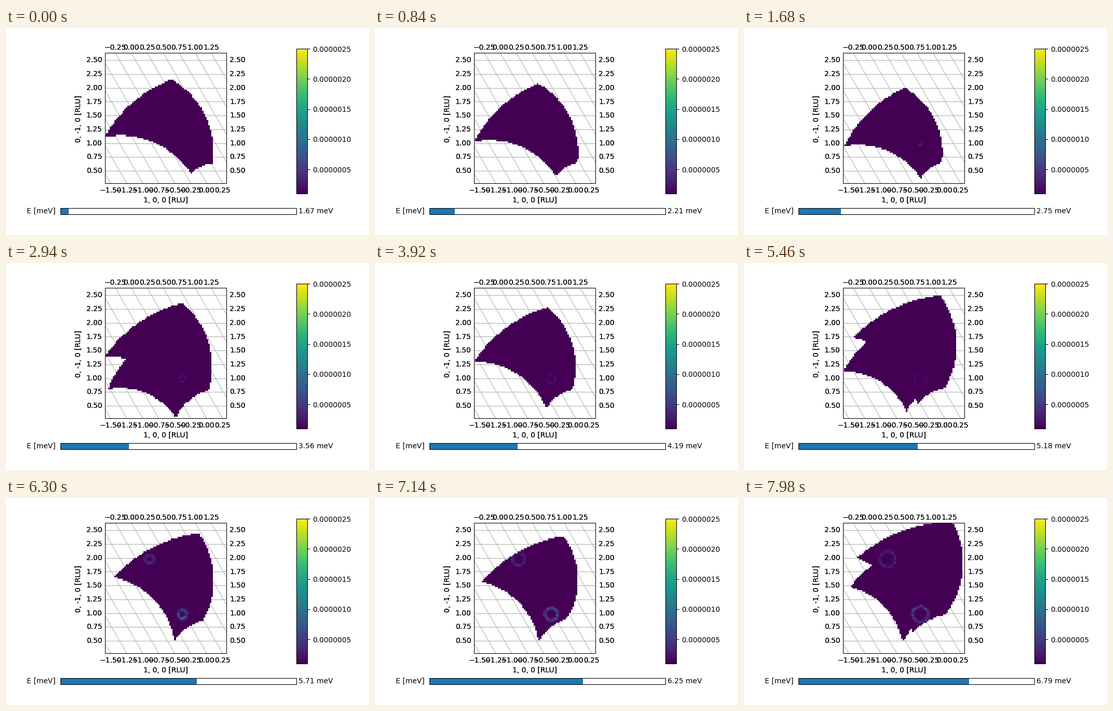
Write a matplotlib script that moves like this. It is 700 by 400 pixels and loops after 8000 ms.

```python
import numpy as np
import matplotlib
import matplotlib.pyplot as plt
from matplotlib.animation import FuncAnimation
from matplotlib.collections import LineCollection
from matplotlib.patches import Rectangle

W, H, DPI = 700, 400, 100
TICK, STEP, LOOP = 20, 140, 8000          # ms
LEFT, TOP, RIGHT, BOTTOM = 191, 48, 425, 300

OX, OY = 403.8, 329.3                     # Q = 0 in pixels
UNIT = 123.3                              # pixels per RLU
ROW = UNIT * np.sqrt(3) / 2
CELL, X0, Y0 = 3.12, 190.3, 47.3

E0, DE = 1.6733, 0.0898                   # meV at the first step, per step
EF_MAX = 5.08                             # highest analysed energy
PERIOD, SPAN = 19, 21                     # steps between and within settings
TILTS = (62.0, 52.3, 42.4, 35.4)          # beam direction of each setting
SWEEP, FAN = 40.8, 67.2                   # sample rotation, detector range

# Spin-wave branches: gap, ring growth, strength, decay, ring width
BRANCHES = [(2.57, 2.5, 0.14, 8, 1.8), (5.2, 3.4, 0.45, 18, 2.6)]
CENTRES = [(340, 224.5, 1.0), (277, 118, 0.45)]

viridis = matplotlib.colormaps["viridis"]
plt.rcParams.update({"font.family": "DejaVu Sans", "font.size": 10})

fig = plt.figure(figsize=(W / DPI, H / DPI), dpi=DPI, facecolor="white")
ax = fig.add_axes([0, 0, 1, 1])
ax.set_xlim(0, W)
ax.set_ylim(H, 0)
ax.axis("off")


def box(x, y, w, h, **style):
    return ax.add_patch(Rectangle((x, y), w, h, **style))


def outline(x, y, w, h):
    return box(x, y, w, h, fill=False, ec="black", lw=0.8, zorder=4)


def segments(lines, color):
    artist = LineCollection(lines, colors=color, linewidths=0.8, zorder=1)
    return ax.add_collection(artist, autolim=False)


def label(x, y, text, ha="center", va="center", **style):
    return ax.text(x, y, text, ha=ha, va=va, **style)


def heavy(*args, **style):
    """Text drawn twice, which darkens its soft edges."""
    for _ in range(2):
        label(*args, **style)


def tick_label(x, y, value, ha="center"):
    text = f"{value:.2f}".replace("-", "\u2212")
    heavy(x, y, text, ha, "center_baseline")


# Oblique grid and its labels
frame = outline(LEFT, TOP, RIGHT - LEFT, BOTTOM - TOP)
lines = []
for v in np.arange(0.5, 2.51, 0.25):
    y = OY - ROW * v
    lines.append([(LEFT, y), (RIGHT, y)])
    tick_label(185.5, y - 1.4, v, "right")
    tick_label(431, y - 1.4, v, "left")
for v in np.arange(-1.5, 1.26, 0.25):
    low, high = (OX + UNIT * v - (OY - y) / np.sqrt(3) for y in (BOTTOM, TOP))
    lines.append([(high, TOP), (low, BOTTOM)])
    if low < RIGHT:
        tick_label(low, 312.3, v)
    if high > LEFT:
        tick_label(high, 36.3, v)
segments(lines, "#b0b0b0").set_clip_path(frame)
heavy(308.3, 333, "1, 0, 0 [RLU]")
heavy(140, 175.3, "0, -1, 0 [RLU]", rotation=90)

# Colour bar
ramp = viridis(np.linspace(1, 0, 280))[:, None, :]
fig.figimage(np.repeat(ramp, 21, axis=1), xo=560, yo=80, origin="upper", zorder=-1)
outline(560, 40, 21, 280)
marks = [40 + n * 280 * 0.5 / 2.4 for n in range(5)]
segments([[(581, y), (586, y)] for y in marks], "black")
for n, y in enumerate(marks):
    label(591, y, f"{(25 - 5 * n) * 1e-7:.7f}", "left", "center_baseline")

# Energy slider
bar = box(105, 348, 16, 12, fc="#1f77b4", lw=0)
outline(105, 348, 455, 12)
label(95.9, 354, "E [meV]", "right")
energy = label(564.2, 354, "", "left")

# Data cells, and the cell that each pixel falls in
cols = np.floor((np.arange(LEFT + 1, RIGHT) + 0.5 - X0) / CELL).astype(int)
rows = np.floor((np.arange(TOP + 1, BOTTOM) + 0.5 - Y0) / CELL).astype(int)
cx = X0 + CELL * (np.arange(cols.max() + 1) + 0.5)
cy = (Y0 + CELL * (np.arange(rows.max() + 1) + 0.5))[:, None]
Q = np.hypot(OX - cx, OY - cy)
THETA = np.degrees(np.arctan2(OX - cx, OY - cy))


def wave_number(e):
    """Neutron wave number in pixels for an energy in meV."""
    return 72.45 * np.sqrt(e)


def coverage(n, s):
    """Cells that setting n reaches, s steps after it starts."""
    ki = wave_number(E0 + EF_MAX + n * PERIOD * DE)
    kf = wave_number(EF_MAX - s * DE)
    cos = np.clip((ki**2 + kf**2 - Q**2) / (2 * ki * kf), -1, 1)
    scatter = np.arccos(cos)
    turn = np.degrees(np.arctan2(kf * np.sin(scatter), ki - kf * cos))
    fan = np.degrees(scatter) - (20.7 - 4 * (n // 2))
    sweep = THETA + turn - TILTS[n]
    return (fan >= 0) & (fan <= FAN) & (sweep >= 0) & (sweep <= SWEEP)


def intensity(step):
    rng = np.random.default_rng(step)
    noise = rng.uniform(0.3, 1.3, Q.shape)
    value = 0.03 * (rng.random(Q.shape) > 0.999)
    e = E0 + DE * step
    for gap, growth, strength, decay, width in BRANCHES:
        if e < gap:
            continue
        radius = growth * np.sqrt(e**2 - gap**2)
        amp = strength * np.exp(-radius / decay)
        for x, y, share in CENTRES:
            off = (np.hypot(cx - x, cy - y) - radius) / width
            value += share * amp * noise * np.exp(-off**2)
    return value


def data_image(step):
    mask = np.zeros(Q.shape, bool)
    for n in range(len(TILTS)):
        s = step - PERIOD * n
        if 0 <= s <= SPAN:
            mask |= coverage(n, s)
    rgba = viridis(intensity(step), bytes=True)
    rgba[..., 3] = 255 * mask
    return rgba[rows[:, None], cols]


data = fig.figimage(data_image(0), xo=LEFT + 1, yo=H - BOTTOM, origin="upper", zorder=1)


def update(i):
    step = i * TICK // STEP
    data.set_data(data_image(step))
    bar.set_width((step + 3) * 455 / 83)
    energy.set_text(f"{E0 + DE * step:.2f} meV")
    return data, bar, energy


anim = FuncAnimation(fig, update, frames=LOOP // TICK, interval=TICK, repeat=True)
plt.show()
```
